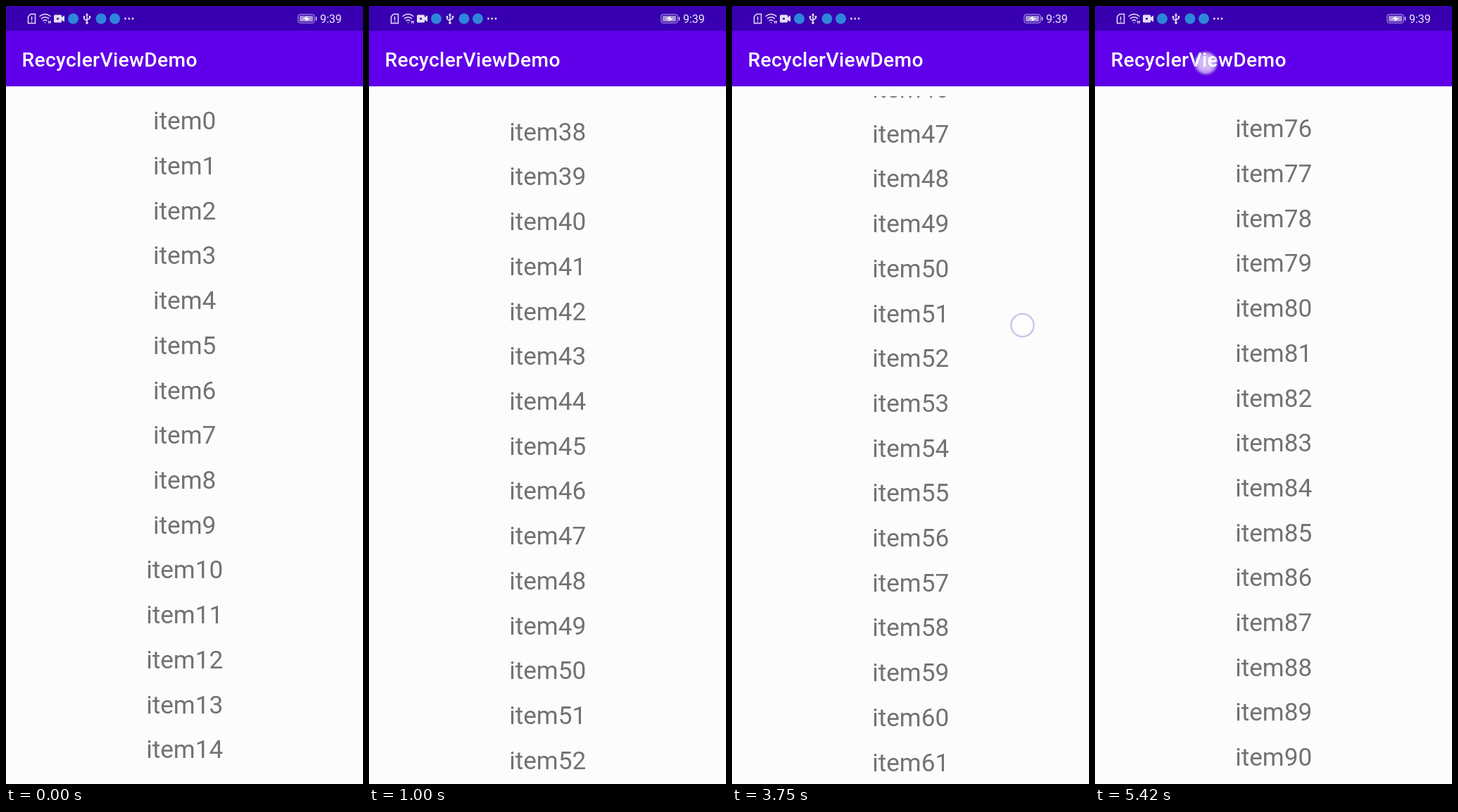
An HTML page for the animation above (5.5 s loop, 507 px wide and 1104 px high).

```html
<!DOCTYPE html>
<html lang="en">
<head>
<meta charset="utf-8">
<title>RecyclerViewDemo</title>
<style>
html, body { margin: 0; width: 100%; height: 100%; overflow: hidden; background: #fcfcfc }
svg { display: block; width: 507px; height: 1104px; font-family: Roboto, sans-serif }
#list { font-size: 35.2px; fill: #727272; text-anchor: middle }
#title { font-size: 28.2px; font-weight: 500; letter-spacing: .0125em; fill: #fff }
.line { fill: none; stroke: #e6dff5; stroke-width: 1.5; stroke-linecap: round }
.solid { fill: #e6dff5 }
</style>
</head>
<body>
<svg viewBox="0 0 507 1104">
  <defs>
    <clipPath id="view"><rect y="128" width="507" height="976"/></clipPath>
    <radialGradient id="glow">
      <stop offset=".5" stop-color="#fff" stop-opacity=".72"/>
      <stop offset=".8" stop-color="#fff" stop-opacity=".5"/>
      <stop offset=".86" stop-color="#9682d2" stop-opacity=".5"/>
      <stop offset=".93" stop-color="#9682d2" stop-opacity=".45"/>
      <stop offset="1" stop-color="#9682d2" stop-opacity="0"/>
    </radialGradient>
  </defs>
  <rect width="507" height="1104" fill="#fcfcfc"/>
  <g clip-path="url(#view)"><g id="list"></g></g>

  <rect width="507" height="114" fill="#6000ea"/>
  <rect width="507" height="35.2" fill="#3800b0"/>
  <text id="title" x="22.5" y="86">RecyclerViewDemo</text>

  <!-- status bar: SIM, Wi-Fi, camera, app dots, USB, more -->
  <path class="line" d="M35 11.5h6.5v13h-10v-9.5zM36.5 15.5v4M36.5 22v.2"/>
  <path class="line" d="M48 14.5q7.5-6 15 0M50.5 17.7q5-4 10 0M53 20.8q2.5-2 5 0M55.5 23.6v.2M60.7 21.5v2.5M63 21.5v2.5"/>
  <path class="solid" d="M69.5 12.5h8q1.5 0 1.5 1.5v2l4-2.5v9l-4-2.5v2q0 1.5-1.5 1.5h-8q-1.5 0-1.5-1.5v-8q0-1.5 1.5-1.5z"/>
  <circle cx="73.5" cy="18" r="1.6" fill="#3800b0"/>
  <g fill="#2e86dc">
    <circle cx="95.5" cy="18" r="7.5"/>
    <circle cx="135" cy="18" r="7.5"/>
    <circle cx="154.5" cy="18" r="7.5"/>
  </g>
  <path class="line" d="M115 12v11M111 16v2.5l4 2.5M119 15.5v2l-4 2.5"/>
  <path class="solid" d="M112.8 13.5l2.2-3.5 2.2 3.5zM117.7 14h2.6v2.5h-2.6z"/>
  <g class="solid">
    <circle cx="111" cy="15.5" r="1.5"/>
    <circle cx="115" cy="24" r="1.8"/>
    <circle cx="169.5" cy="18" r="1.4"/>
    <circle cx="174.8" cy="18" r="1.4"/>
    <circle cx="180" cy="18" r="1.4"/>
  </g>

  <rect x="415" y="12" width="23" height="12" rx="2.5" fill="none" stroke="#c4b6e8"/>
  <rect x="417" y="14" width="19" height="8" rx="1" fill="#a691da"/>
  <path d="M421 18.5l7-4-.5 3h5l-7 4 .5-3z" fill="#fff"/>
  <path class="line" d="M440.5 16v4"/>
  <text x="446" y="23.5" font-size="16" fill="#eee8fa">9:39</text>

  <circle id="touch" r="18" fill="url(#glow)"/>
</svg>
<script>
const LOOP = 5500, FPS = 12, PITCH = 63.71, BASE = 175.3;
const list = document.getElementById('list');
const touch = document.getElementById('touch');
const rows = Array.from({ length: 17 }, () => {
  const row = document.createElementNS('http://www.w3.org/2000/svg', 'text');
  row.setAttribute('x', 253.7);
  return list.appendChild(row);
});

// Presses: first and last tick, position, tick drawn at half strength
const presses = [
  { from: 13, to: 23, x: 383.5, y: 456, faint: 23 },
  { from: 45, to: 45, x: 412.5, y: 453 },
  { from: 51, to: 59, x: 320.5, y: 695.5, faint: 59 },
  { from: 64, to: 65, x: 157.5, y: 81, faint: 64 }
];

// Each fling slows evenly until a press halts it
const fling = (start, speed, drag, n, stop) =>
  Math.min(stop, start + speed * n - drag * n * n);

function scrollAt(tick) {
  if (tick < 2) return 0;
  if (tick < 45) return fling(1475.3, 230.2, 8.83, Math.min(tick - 7, 6), 2538.4);
  return fling(2976, 406.6, 12, Math.min(tick - 45, 6), 4831);
}

function draw(ms) {
  const tick = Math.floor(Math.floor(ms % LOOP / 10) * FPS / 100);
  const scroll = scrollAt(tick);
  const first = Math.max(0, Math.floor(scroll / PITCH) - 1);
  rows.forEach((row, i) => {
    row.textContent = 'item' + (first + i);
    row.setAttribute('y', (BASE + (first + i) * PITCH - scroll).toFixed(2));
  });

  const press = presses.find(p => tick >= p.from && tick <= p.to);
  touch.setAttribute('opacity', !press ? 0 : press.faint === tick ? 0.5 : 1);
  if (press) touch.setAttribute('transform', `translate(${press.x} ${press.y})`);
}

const begin = performance.now();
(function frame() {
  draw(performance.now() - begin);
  requestAnimationFrame(frame);
})();
</script>
</body>
</html>
```
